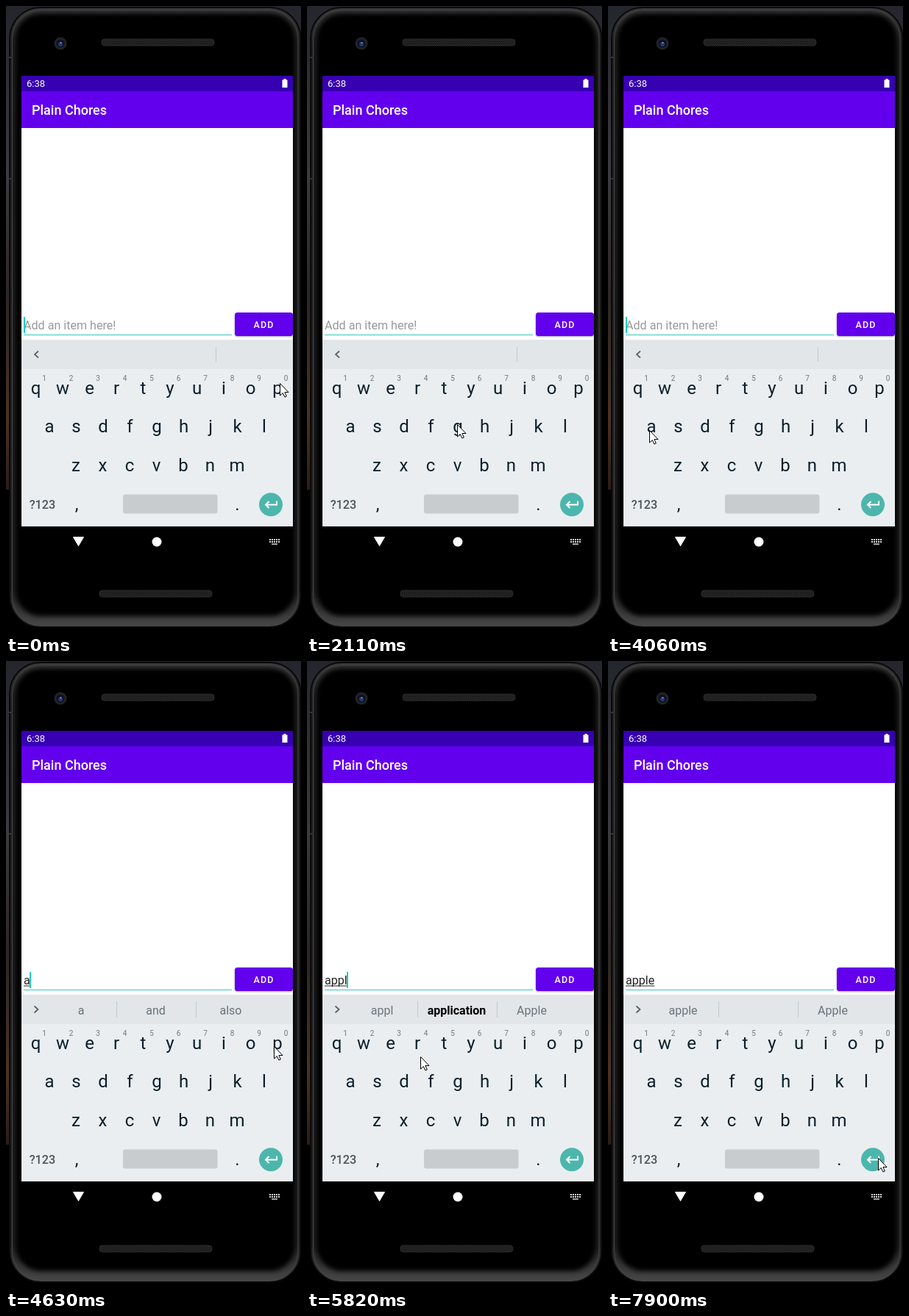
These frames come from a looping animation (401x853 px, 8000 ms). An HTML page:

```html
<!DOCTYPE html>
<html lang="en">
<head>
<meta charset="utf-8">
<style>
  html, body { margin: 0; width: 100%; height: 100%; overflow: hidden; background: #000; }
  svg { display: block; width: 401px; height: 853px; font-family: Roboto, sans-serif; }
  .mid { text-anchor: middle; }
  .key { font-size: 24px; fill: #0b1f2a; }
  .digit { font-size: 10px; fill: #70787d; }
  .suggestion { font-size: 16px; fill: #69747a; }
  .strong { font-weight: 700; fill: #000; }
  .raised { filter: drop-shadow(0 1px 1px #0005); }
  .soft { filter: blur(3px); }
</style>
</head>
<body>
<svg viewBox="0 0 401 853">
  <defs>
    <linearGradient id="wall" x2="0" y2="1">
      <stop offset="0" stop-color="#25262d"/>
      <stop offset=".35" stop-color="#3c3b3f"/>
      <stop offset=".6" stop-color="#2c2626"/>
      <stop offset=".85" stop-color="#4a3322"/>
      <stop offset="1" stop-color="#2a1d17"/>
    </linearGradient>
    <linearGradient id="shell" x2="0" y2="1">
      <stop offset="0" stop-color="#3a3a3a"/>
      <stop offset=".06" stop-color="#202020"/>
      <stop offset=".94" stop-color="#202020"/>
      <stop offset="1" stop-color="#484848"/>
    </linearGradient>
    <pattern id="mesh" width="3" height="3" patternUnits="userSpaceOnUse">
      <rect width="3" height="3" fill="#262626"/>
      <path d="M0 0h1v1H0zM1.5 1.5h1v1h-1z" fill="#0c0c0c"/>
    </pattern>
  </defs>

  <!-- Phone body -->
  <rect width="401" height="658" fill="url(#wall)"/>
  <rect x="5" y="2" width="395.5" height="843" rx="42" fill="url(#shell)" stroke="#0a0a0a" stroke-width="2"/>
  <rect class="soft" x="13" y="10" width="380" height="820" rx="34"/>
  <rect x="8.5" y="5.500" width="388.500" height="836" rx="39" fill="none" stroke="#444"/>
  <path d="M4 70h5M4 235h5" stroke="#333" stroke-width="2"/>
  <rect x="130" y="45" width="153" height="9" rx="4" fill="url(#mesh)" stroke="#2b2b2b"/>
  <rect x="127" y="795" width="153" height="9" rx="4" fill="url(#mesh)" stroke="#2b2b2b"/>
  <circle cx="74" cy="51" r="8.5" fill="#222327"/>
  <circle cx="74" cy="51" r="5.5" fill="#10121d"/>
  <circle cx="74" cy="52" r="3" fill="#24377e"/>
  <circle cx="74.5" cy="50" r="1" fill="#8ba4d8"/>

  <!-- App -->
  <rect x="21" y="95" width="369" height="613" fill="#fff"/>
  <rect x="21" y="95" width="369" height="21" fill="#3700b3"/>
  <rect x="21" y="116" width="369" height="50" fill="#6200ee"/>
  <text x="28" y="110" font-size="13" fill="#fff">6:38</text>
  <path d="M377.5 99h3v1.5h2V111h-7V100.5h2z" fill="#fff"/>
  <text x="35" y="148" font-size="18" font-weight="500" fill="#fff">Plain Chores</text>
  <path d="M24 447.5H307" stroke="#35c9b8" stroke-width="1.2"/>
  <text id="field" x="24" y="440" font-size="16.1"></text>
  <rect id="underline" x="24" y="441.5" height="1" fill="#222"/>
  <rect id="caret" y="423" width="2" height="22" fill="#1fcfbc"/>
  <rect class="raised" x="311" y="417" width="79" height="32" rx="3.5" fill="#6200ee"/>
  <text class="mid" x="350.5" y="438" font-size="12.5" font-weight="500" letter-spacing="1.1" fill="#fff">ADD</text>

  <!-- Keyboard -->
  <rect x="21" y="454" width="369" height="254" fill="#eaeef1"/>
  <rect x="21" y="454" width="369" height="40" fill="#e2e6e9"/>
  <path id="chevron" fill="none" stroke="#566066" stroke-width="1.7"/>
  <path id="dividers" stroke="#c3c8cb"/>
  <text class="mid suggestion" x="102" y="480.5"></text>
  <text class="mid suggestion" x="203.5" y="480.5"></text>
  <text class="mid suggestion" x="305.5" y="480.5"></text>
  <g id="keys"></g>
  <text class="mid" x="49.5" y="683.5" font-size="16.3" font-weight="500" fill="#4b565c">?123</text>
  <rect x="159" y="664.5" width="128.5" height="26" rx="3" fill="#c8cccf"/>
  <circle cx="360" cy="678.3" r="16" fill="#4db6ac"/>
  <path d="M368 673.5v5H353M357.5 674l-4.5 4.5 4.5 4.5" fill="none" stroke="#fff" stroke-width="2"/>

  <!-- Navigation -->
  <path d="M91.5 722.5h14l-7 12z" fill="#fff" stroke="#fff" stroke-linejoin="round"/>
  <circle cx="205" cy="729" r="6.5" fill="#fff"/>
  <path d="M358 726h14M358 729h14" stroke="#ddd" stroke-width="1.8" stroke-dasharray="2 1"/>
  <path d="M361 732h8" stroke="#ddd" stroke-width="1.5"/>

  <path id="pointer" d="M.5.5V17L4.3 13.5 6.9 19 9.3 18 6.9 12.5H12z" fill="#fff" stroke="#000"/>
</svg>
<script>
const LOOP = 8000;
const $ = id => document.getElementById(id);
const slots = [...document.querySelectorAll('.suggestion')];

const home = { x: 372, y: 513 };
const moves = [
  { from: 20, to: 540, x: 273, y: 545 },
  { from: 780, to: 1310, x: 204, y: 569 },
  { from: 2110, to: 3130, x: 220, y: 518 },
  { from: 3430, to: 3820, x: 56, y: 577 },
  { from: 4080, to: 4630, x: 364, y: 524 },
  { from: 4950, to: 5290, x: 342, y: 577 },
  { from: 5450, to: 5820, x: 154, y: 538 },
  { from: 5820, to: 6100, x: 113, y: 524 },
  { from: 6400, to: 6790, x: 143, y: 514 },
  { from: 6790, to: 7500, x: 389, y: 640 },
  { from: 7500, to: 7900, x: 367, y: 676 }
];

// Suggestions shown after each typed letter
const typing = [
  { at: 4210, words: ['a', 'and', 'also'] },
  { at: 4790, words: ['ap', 'app', 'apply'] },
  { at: 5120, words: ['app', 'apple', 'apps'] },
  { at: 5450, words: ['appl', 'application', 'Apple'], strong: true },
  { at: 6390, words: ['apple', '', 'Apple'] }
];

function addKeys(letters, x, y, className = 'key', step = 36.5) {
  $('keys').innerHTML += [...letters].map((letter, i) =>
    `<text class="mid ${className}" x="${x + i * step}" y="${y}">${letter}</text>`).join('');
}
addKeys('qwertyuiop', 40.5, 528);
addKeys('1234567890', 52, 510, 'digit');
addKeys('asdfghjkl', 59, 580);
addKeys('zxcvbnm', 95, 633);
addKeys(',.', 96, 686, 'key', 218.5);

function pointerAt(t) {
  let { x, y } = home;
  for (const move of moves) {
    const k = Math.min(1, Math.max(0, (t - move.from) / (move.to - move.from)));
    const eased = k * (2 - k);
    x += (move.x - x) * eased;
    y += (move.y - y) * eased;
  }
  return [Math.round(x), Math.round(y)];
}

// The caret blinks evenly and restarts its cycle at each letter
function caretOn(t, typed) {
  return typed ? (t - typed.at) % 1000 < 500 : (t + 370) % 1040 < 520 === t < 150 || (t + 500) % 1040 < 520;
}

function draw(t) {
  const typed = typing.findLast(letter => letter.at <= t);
  const words = typed ? typed.words : ['', '', ''];
  const field = $('field');
  field.textContent = words[0] || 'Add an item here!';
  field.setAttribute('fill', typed ? '#222' : '#999');
  const width = typed ? field.getComputedTextLength() : 0;
  $('underline').setAttribute('width', width);
  $('caret').setAttribute('x', 24 + Math.floor(Math.max(0, width - 0.5)));
  $('caret').setAttribute('opacity', Number(caretOn(t, typed)));

  $('chevron').setAttribute('d', typed ? 'M38.5 469.5l5 4.5-5 4.5' : 'M44 469.5l-5 4.5 5 4.5');
  $('dividers').setAttribute('d', typed ? 'M150.5 463v22M258.5 463v22' : 'M285.5 464v20');
  slots.forEach((slot, i) => slot.textContent = words[i]);
  slots[1].classList.toggle('strong', Boolean(typed?.strong));

  $('pointer').setAttribute('transform', `translate(${pointerAt(t)})`);
}

const began = performance.now();
function frame() {
  draw((performance.now() - began) % LOOP);
  requestAnimationFrame(frame);
}
frame();
</script>
</body>
</html>
```
